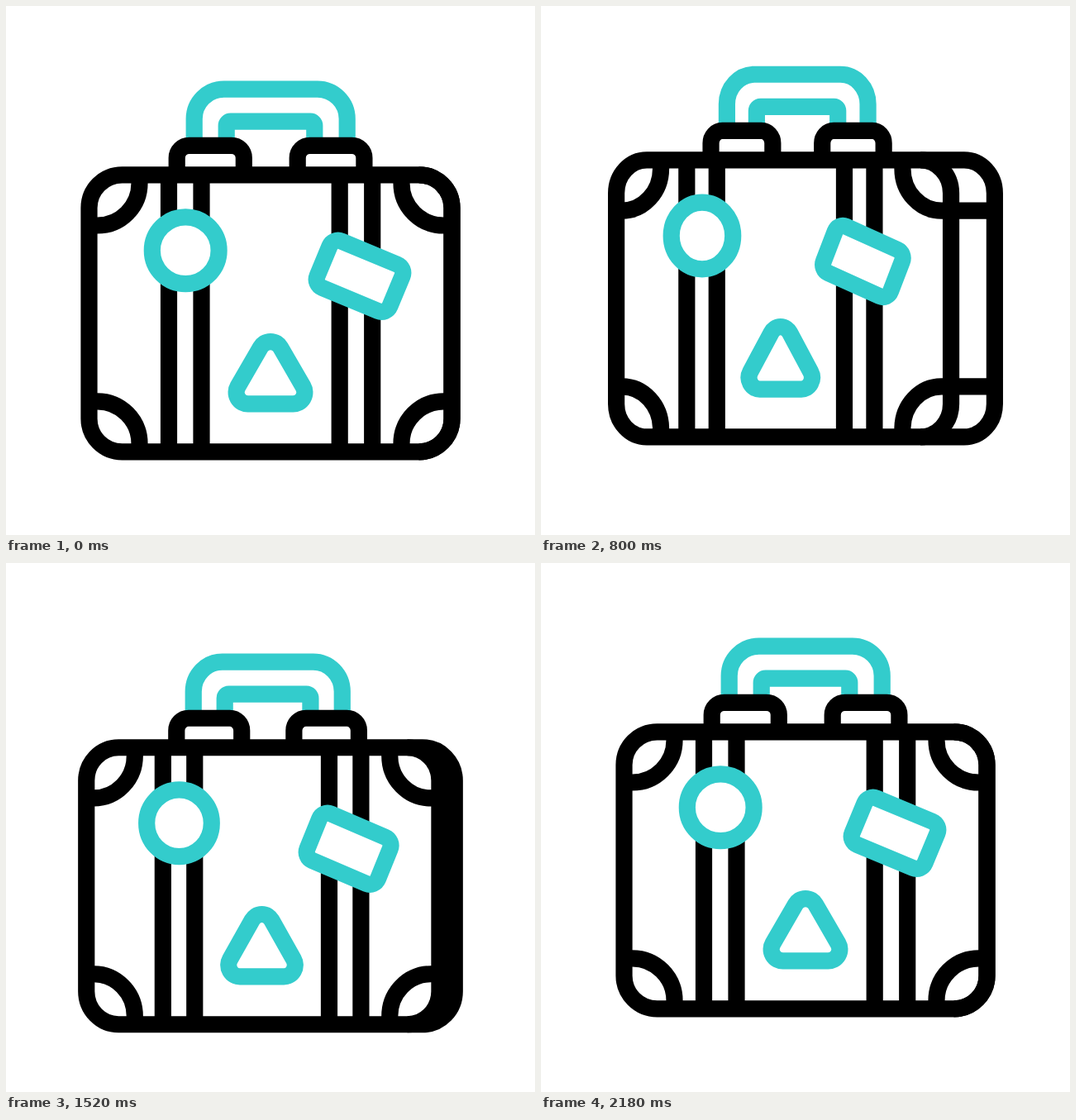
An HTML page for the animation above (3600 ms loop, 640x640 px).

```html
<!DOCTYPE html>
<html lang="en">
<head>
<meta charset="utf-8">
<title>Suitcase</title>
<style>
  html, body { margin: 0; width: 100%; height: 100%; overflow: hidden; background: #fff; }
  svg { display: block; width: 640px; height: 640px; }
  svg * { vector-effect: non-scaling-stroke; }
  .line { fill: none; stroke: #000; stroke-width: 20.2; }
  .teal { stroke: #3cc; }
  .sticker { fill: #fff; }
</style>
</head>
<body>
<svg viewBox="0 0 640 640">
  <g id="case" class="line">
    <g id="handle">
      <path class="teal" d="M227.7 168V136.6A36 36 0 0 1 263.7 100.6H376.7A36 36 0 0 1 412.7 136.6V168"/>
      <path class="teal" d="M266.7 168V144.7A5 5 0 0 1 271.7 139.7H368.3A5 5 0 0 1 373.3 144.7V168"/>
      <path d="M206.7 204V183.8A15 15 0 0 1 221.7 168.8H272.8A15 15 0 0 1 287.8 183.8V204"/>
      <path d="M352.7 204V183.8A15 15 0 0 1 367.7 168.8H418.4A15 15 0 0 1 433.4 183.8V204"/>
    </g>
    <path id="side"/>
    <rect id="front" x="100.5" y="204.3" width="439" height="335" rx="40"/>
    <g id="corners">
      <path d="M161.5 204V214.5A51 51 0 0 1 110.5 265.5H100.5"/>
      <path d="M478.5 204V214.5A51 51 0 0 0 529.5 265.5H539.5"/>
      <path d="M161.5 539V529.3A51 51 0 0 0 110.5 478.3H100.5"/>
      <path d="M478.5 539V529.3A51 51 0 0 1 529.5 478.3H539.5"/>
    </g>
    <g id="decor">
      <path d="M197 204V539M236.5 204V539M403.7 204V539M443.2 204V539"/>
      <g class="teal sticker">
        <circle cx="217.2" cy="295.8" r="40.4"/>
        <rect x="-47.6" y="-30.5" width="95.2" height="61" rx="11" transform="translate(428 326.8) rotate(22.6)"/>
        <path d="M280.5 460.4L307.9 413A14 14 0 0 1 332.1 413L359.5 460.4A14 14 0 0 1 347.4 481.4H292.6A14 14 0 0 1 280.5 460.4Z"/>
      </g>
    </g>
  </g>
</svg>
<script>
const LOOP = 3600, CENTER = 320, SQUEEZE = 0.106, DEPTH = 12.8;
const SMOOTH = [1 / 3, 2 / 3], FLOAT = [0.225, 0.12];

// Pose at each key time: vertical offset, turn, and the easing that leads there.
const keys = [
  { t: 200, y: 0, turn: 0 },
  { t: 440, y: 38.5, turn: 0, ease: SMOOTH },
  { t: 1360, y: -38.5, turn: 1, ease: FLOAT },
  { t: 1600, y: 38.5, turn: 0, ease: SMOOTH },
  { t: 1840, y: -38.5, turn: 0, ease: SMOOTH },
  { t: 2180, y: 0, turn: 0, ease: SMOOTH }
];

// How far each layer slides sideways in a full turn.
const slides = { handle: -13.6, front: -36.1, corners: -39.3, decor: -41.3 };

const byId = id => document.getElementById(id);
const mix = (a, b, k) => a + (b - a) * k;

// Cubic Bezier with flat ends, solved for x by bisection.
function bezier(x, [x1, x2]) {
  let low = 0, high = 1, s = 0.5;
  for (let i = 0; i < 24; i++) {
    s = (low + high) / 2;
    const at = 3 * x1 * s * (1 - s) ** 2 + 3 * x2 * s * s * (1 - s) + s ** 3;
    if (at < x) low = s; else high = s;
  }
  return s * s * (3 - 2 * s);
}

function poseAt(time) {
  const next = keys.findIndex(key => key.t > time);
  if (next < 1) return keys[0];
  const a = keys[next - 1], b = keys[next];
  const k = bezier((time - a.t) / (b.t - a.t), b.ease);
  return { y: mix(a.y, b.y, k), turn: mix(a.turn, b.turn, k) };
}

function sidePath(turn, scale) {
  const frontX = x => CENTER + slides.front * turn + (x - CENTER) * scale;
  const start = frontX(499.5), edge = frontX(539.5);
  const right = 539.5 + DEPTH * turn, rx = 40 * scale;
  return `M${start} 204.3H${right - rx}A${rx} 40 0 0 1 ${right} 244.3V499.3` +
    `A${rx} 40 0 0 1 ${right - rx} 539.3H${start}` +
    `M${edge} 265.5H${right}M${edge} 478.3H${right}`;
}

function draw() {
  const { y, turn } = poseAt(performance.now() % LOOP);
  const scale = 1 - SQUEEZE * turn;
  byId('case').setAttribute('transform', `translate(0 ${y})`);
  for (const id in slides) {
    const x = CENTER * (1 - scale) + slides[id] * turn;
    byId(id).setAttribute('transform', `matrix(${scale} 0 0 1 ${x} 0)`);
  }
  byId('side').setAttribute('d', sidePath(turn, scale));
  requestAnimationFrame(draw);
}
draw();
</script>
</body>
</html>
```
